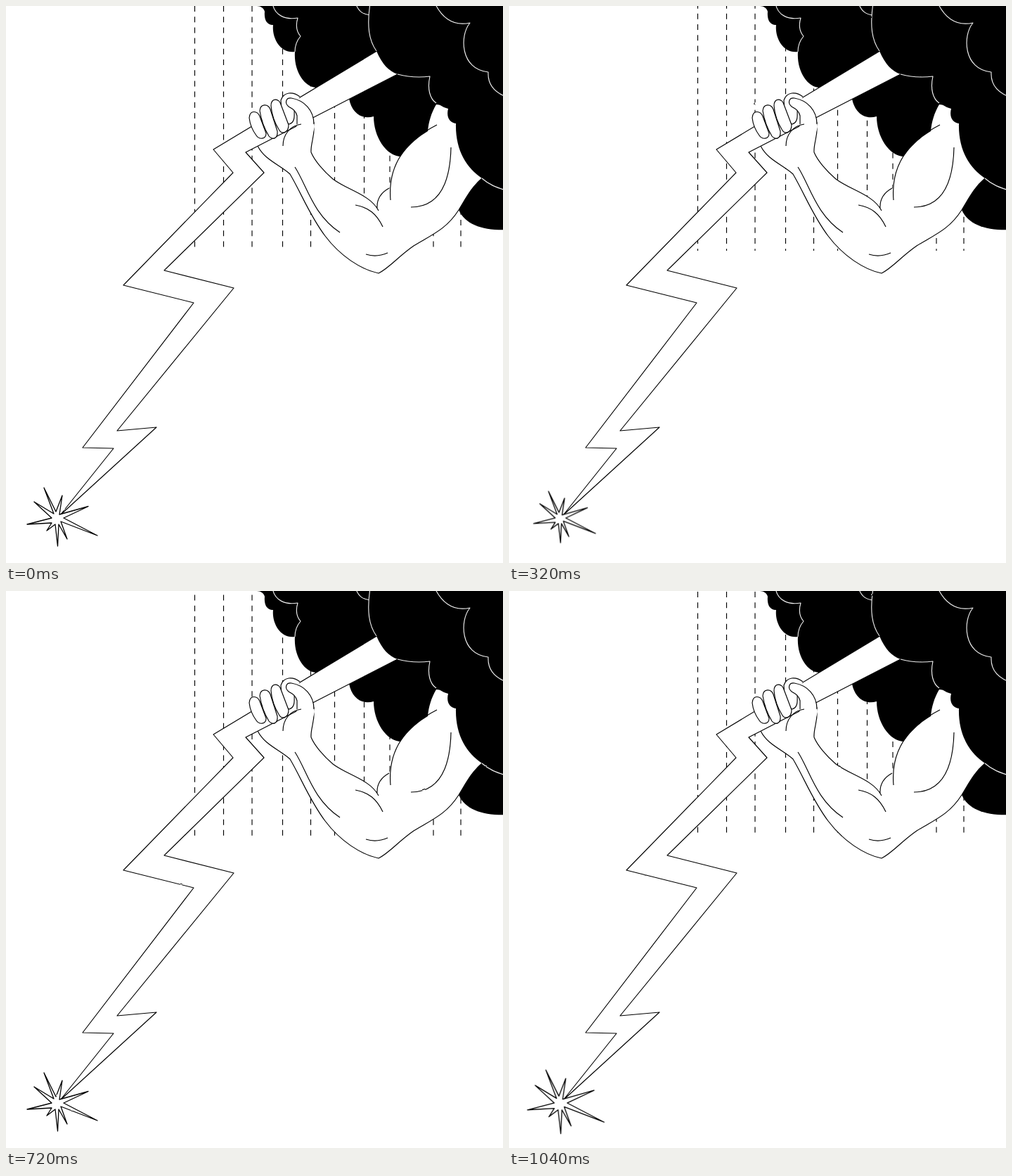
These frames come from a looping animation (707x792 px, 1120 ms). An HTML page:

```html
<!DOCTYPE html>
<html>
<head>
<meta charset="utf-8">
<style>
  html, body { margin: 0; width: 100%; height: 100%; overflow: hidden; background: #fff; }
  svg { display: block; }
  .ink { fill: none; stroke: #000; }
  .paper { fill: #fff; stroke: none; }
  .both { fill: #fff; stroke: #000; }
  .chalk { fill: none; stroke: #eee; }
</style>
</head>
<body>
<svg width="707" height="792" viewBox="0 0 707 792" stroke-width="1.15" stroke-linejoin="round">
  <defs>
    <filter id="wobble" filterUnits="userSpaceOnUse" x="-10" y="-10" width="730" height="812" color-interpolation-filters="sRGB">
      <feTurbulence id="noise" type="fractalNoise" baseFrequency=".09" numOctaves="1"/>
      <feDisplacementMap in="SourceGraphic" scale="1.6" xChannelSelector="R" yChannelSelector="G"/>
    </filter>
    <clipPath id="sky"><path d="M0,0H707V348H0Z"/></clipPath>
  </defs>
  <g filter="url(#wobble)">
    <path id="rain" class="ink" clip-path="url(#sky)" stroke-dasharray="8 7.2"/>

    <!-- back cloud -->
    <path d="M357,-10V0C362,0 367,3 368,8C367,18 370,27 380,27C378,45 390,68 411,65C409,92 424,115 441,116
      L488,132C492,152 506,162 523,157C523,185 540,214 563,214L625,190V-10Z"/>
    <path d="M644,290C654,312 680,320 717,318V230H660Z"/>
    <path class="chalk" d="M379,-4C382,14 398,20 415,17C412,27 413,36 419,43C413,50 411,57 411,65M498,-2C502,8 508,12 518,13"/>

    <!-- arm -->
    <path class="paper" d="M612,140C605,152 601,165 600,178C575,193 548,220 546,259C535,264 527,276 528,288
      C516,268 486,262 465,246C452,235 439,220 434,208C433,195 440,185 438,165L390,170L358,199
      C368,219 390,226 404,239C420,266 432,298 454,327C475,355 505,375 530,380C546,372 558,356 580,341
      C606,325 626,318 644,290C655,272 662,258 677,245L690,150Z"/>
    <path class="ink" d="M613,169C578,187 542,218 547,276M545,259C534,265 527,274 528,288M530,291C518,268 486,262 465,246
      C452,235 439,220 434,208C433,195 440,185 438,165
      M358,199C368,219 390,226 404,239C420,266 432,298 454,327C475,355 505,375 530,380C546,372 558,356 580,341
      C606,325 626,318 644,290C655,272 662,258 677,245
      M411,229C428,255 436,296 475,322M497,283C515,286 527,295 536,314M512,353Q527,358 543,351
      M633,201C632,245 620,286 576,286"/>

    <!-- bolt -->
    <path class="both" d="M540,56.5L295,204L323,237L167,397L267,422L109,628L153,629L77,724L214,599L158,604
      L324,401L225,376L367,237L341,208L557,97L575,88"/>

    <!-- front cloud -->
    <path d="M519,-10C512,30 517,50 527,64C535,83 545,93 557,97C572,101 587,102 603,100C598,120 609,141 629,146
      C626,158 631,166 640,167C639,205 655,230 677,245C687,254 697,258 717,264V-10Z"/>
    <path class="chalk" d="M519,-10C512,30 517,50 527,64M557,97C572,101 587,102 603,100C599,118 603,132 612,138
      M677,245C687,254 697,258 717,264
      M611,-2C621,17 637,29 660,24C645,42 646,90 686,94C685,111 694,124 717,131"/>

    <!-- hand -->
    <path class="both" d="M418,129C408,121 395,122 391,134C391,146 394,167 403,168C412,165 410,155 410,145"/>
    <path class="both" d="M377,142C377,130 389,131 391,140L402,169C402,180 393,183 389,177C382,166 378,155 377,142Z"/>
    <path class="both" d="M361,149C362,138 373,139 376,147L386,178C387,189 379,191 374,185C368,175 363,162 361,149Z"/>
    <path class="both" d="M346,159C347,147 358,149 361,157L370,181C370,190 360,190 356,184C350,176 347,168 346,159Z"/>
    <path class="paper" d="M414,168L414,156C412,148 407,146 402,143C396,138 398,130 406,131C424,134 438,148 439,172L434,190L412,180Z"/>
    <path class="ink" d="M414,168L414,156C412,148 407,146 402,143C396,138 398,130 406,131C424,134 438,148 438,168
      M420,168C404,170 394,183 394,199"/>

    <path id="star" class="both" vector-effect="non-scaling-stroke" stroke-width="1.3"
      d="M54,685L71,719L80,696L76,723L117,711.5L82,728L130,753L78,733L87,758L75,737L73.5,768L70,737
      L58,746L65,735L30,737L65,728L40,705L68,722Z"/>
  </g>
</svg>
<script>
  const STEP = 80, STEPS = 14, PERIOD = 15.2;
  const get = id => document.getElementById(id);
  const rain = get('rain'), star = get('star'), noise = get('noise');

  rain.setAttribute('d', [268.5, 309.5, 350, 393.5, 433.5, 467.5, 509.5, 546, 608, 647]
    .map(x => `M${x},0V360`).join(''));

  // The spark holds each size for a few steps.
  const sparkSize = n => n < 3 ? 1 : n < 7 ? .88 : n < 10 ? 1 : 1.09;

  function draw(now) {
    const n = Math.floor(now / STEP) % STEPS;
    rain.setAttribute('stroke-dashoffset', n * PERIOD / STEPS);
    star.setAttribute('transform', `translate(72 728) scale(${sparkSize(n)}) translate(-72 -728)`);
    noise.setAttribute('seed', n + 1);
  }

  const start = performance.now();
  function tick() {
    draw(performance.now() - start);
    requestAnimationFrame(tick);
  }
  draw(0);
  tick();
</script>
</body>
</html>
```
